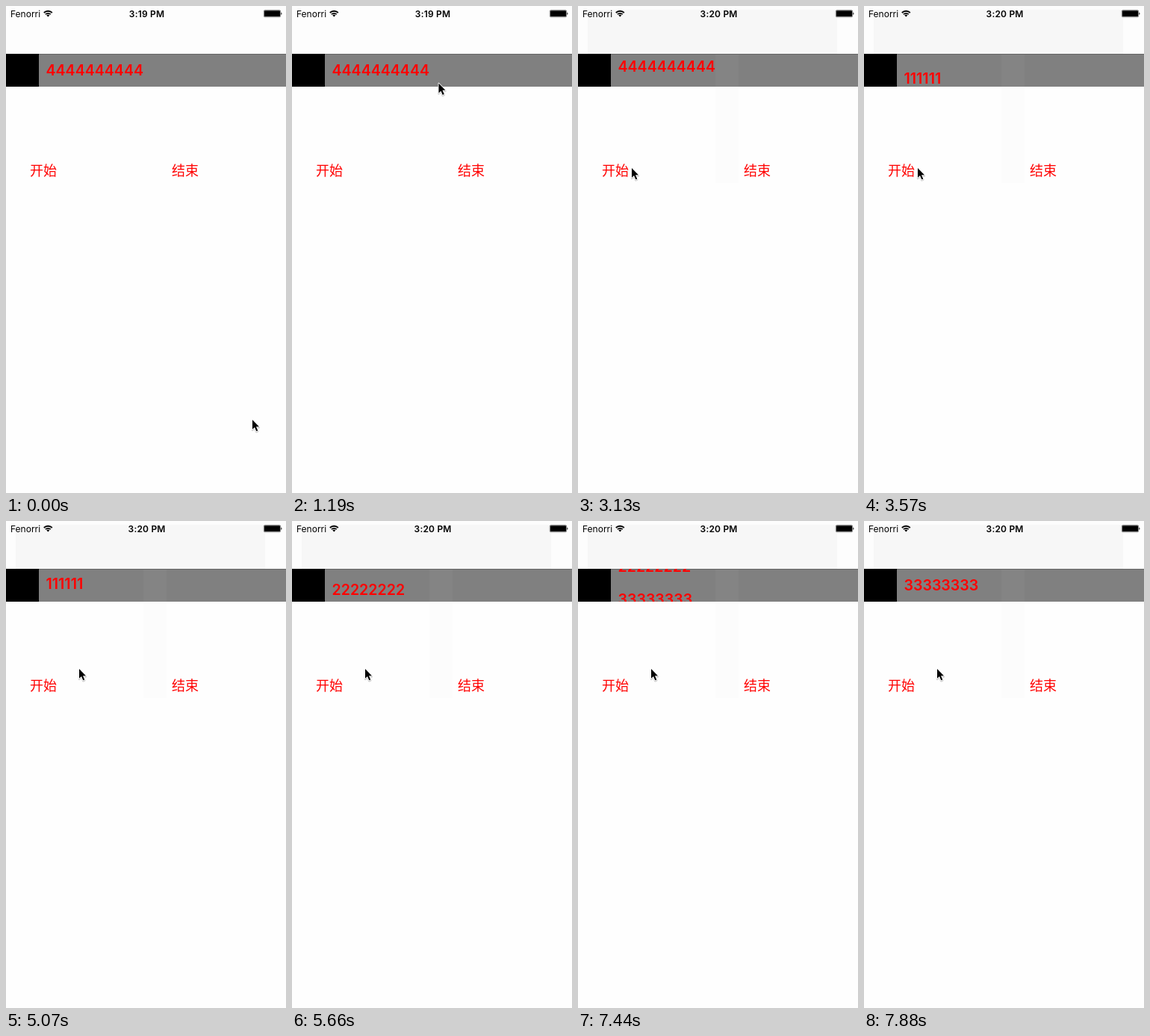
An HTML page that plays this animation: 375 px wide and 652 px high, repeating every 8 s.

```html
<!DOCTYPE html>
<html lang="zh-CN">
<head>
<meta charset="utf-8">
<title>Vertical ticker</title>
<style>
  html, body { margin: 0; width: 100%; height: 100%; overflow: hidden; background: #fefefe; }
  svg { display: block; }
  .status { font: 12px Inter, Roboto, sans-serif; }
  #clock { font-weight: 600; letter-spacing: .2px; text-anchor: middle; }
  .ticker { font: 600 19.6px Inter, Roboto, sans-serif; fill: #f00; }
  .button { font: 18px "Noto Sans CJK SC", "Noto Sans CJK", sans-serif; fill: #f00; }
</style>
</head>
<body>
<svg width="375" height="652" viewBox="0 0 375 652">
  <rect width="375" height="64" fill="#fdfdfd"/>
  <rect id="navTint" x="13" y="5" width="334" height="59" fill="#f7f7f7"/>

  <g class="status">
    <text x="6" y="14.5">Fenorri</text>
    <text id="clock" x="188.6" y="14.5"></text>
  </g>
  <g fill="none" stroke="#000" stroke-width="1.8">
    <path d="M50.8 9A7.8 7.8 0 0 1 61.8 9"/>
    <path d="M52.9 11.2A4.8 4.8 0 0 1 59.7 11.2"/>
  </g>
  <path d="M56.3 14.6L54.3 12.5A2.9 2.9 0 0 1 58.3 12.5Z"/>
  <rect x="345.3" y="5.6" width="22.4" height="9.2" rx="1.6" fill="none" stroke="#000" stroke-width=".5"/>
  <rect x="346" y="6.3" width="21" height="7.8" rx=".8"/>
  <path d="M368.4 8.5A2.2 2.2 0 0 1 368.4 11.9Z"/>

  <rect y="64" width="375" height="44" fill="#808080"/>
  <g id="stripe">
    <rect x="184" y="64" width="31" height="44" fill="#848484"/>
    <rect x="184" y="108" width="31" height="129" fill="#fcfcfc"/>
  </g>
  <rect y="64" width="375" height="1" fill="#666"/>
  <rect y="64" width="44" height="44"/>
  <svg y="64" width="375" height="44" overflow="hidden" class="ticker">
    <text id="leaving" x="53.5"></text>
    <text id="arriving" x="53.5"></text>
  </svg>

  <text class="button" x="32" y="227">开始</text>
  <text class="button" x="222" y="227">结束</text>

  <g id="cursor" stroke-linejoin="round">
    <path d="M1 2.2V14.8L4 12L6.3 17.3L8.3 16.4L6 11.2H10Z" stroke="#000" stroke-width="2.4" opacity=".2"/>
    <path d="M1 .9V13.8L4 11L6.3 16.3L8.3 15.4L6 10.2H10Z" stroke="#fff" stroke-width="1.8" paint-order="stroke"/>
  </g>
</svg>
<script>
const LOOP = 8000, TICK = 149;
const ROW = 44, BASELINE = 29.3;
const FIRST_SLIDE = 2905, SLIDE_EVERY = 2000, SLIDE_TIME = 1000;
const CLOCK_CHANGE = 2830;
const LINES = ['4444444444', '111111', '22222222', '33333333'];

const EXIT_TIME = 447, RETURN = 890, SWOOP_TIME = 900;
const SWOOP_END = [252, 227];
const GLIDES = [
  { start: 1788, time: 298, to: [240, 225] },
  { start: 2235, time: 298, to: [61, 218] },
  { start: 2682, time: 298, to: [71, 216] },
  { start: 3576, time: 596, to: [97, 197] }
];

const [leaving, arriving, clock, cursor, navTint, stripe] =
  ['leaving', 'arriving', 'clock', 'cursor', 'navTint', 'stripe']
    .map(id => document.getElementById(id));

const clamp = p => Math.max(0, Math.min(1, p));
const easeInOut = p => (1 - Math.cos(Math.PI * p)) / 2;
const progress = (t, start, time) => easeInOut(clamp((t - start) / time));

function pointerAt(t) {
  // Drops off the bottom edge, then returns in an out-and-back swoop.
  if (t < RETURN) {
    const p = t / EXIT_TIME;
    return [329 + 27 * p, 553 + 130 * p * p];
  }
  const swing = Math.sin(Math.PI * clamp((t - RETURN) / SWOOP_TIME));
  let [x, y] = SWOOP_END;
  x -= 65 * swing;
  y -= 143 * swing;
  for (const { start, time, to } of GLIDES) {
    const p = progress(t, start, time);
    x += (to[0] - x) * p;
    y += (to[1] - y) * p;
  }
  return [x, y];
}

function setLine(node, text, offset) {
  node.textContent = text;
  node.setAttribute('y', BASELINE + offset);
}

function draw(now) {
  // The screen refreshes in coarse, even ticks.
  const t = Math.floor((now % LOOP + 20) / TICK) * TICK;

  const slide = Math.max(0, Math.floor((t - FIRST_SLIDE) / SLIDE_EVERY));
  const shift = ROW * progress(t, FIRST_SLIDE + slide * SLIDE_EVERY, SLIDE_TIME);
  setLine(leaving, LINES[slide], -shift);
  setLine(arriving, LINES[slide + 1], ROW - shift);

  const later = t >= CLOCK_CHANGE;
  clock.textContent = later ? '3:20 PM' : '3:19 PM';
  navTint.style.opacity = stripe.style.opacity = later ? 1 : 0;

  cursor.setAttribute('transform', `translate(${pointerAt(t)})`);
}

const origin = performance.now();
function frame() {
  draw(performance.now() - origin);
  requestAnimationFrame(frame);
}
frame();
</script>
</body>
</html>
```
